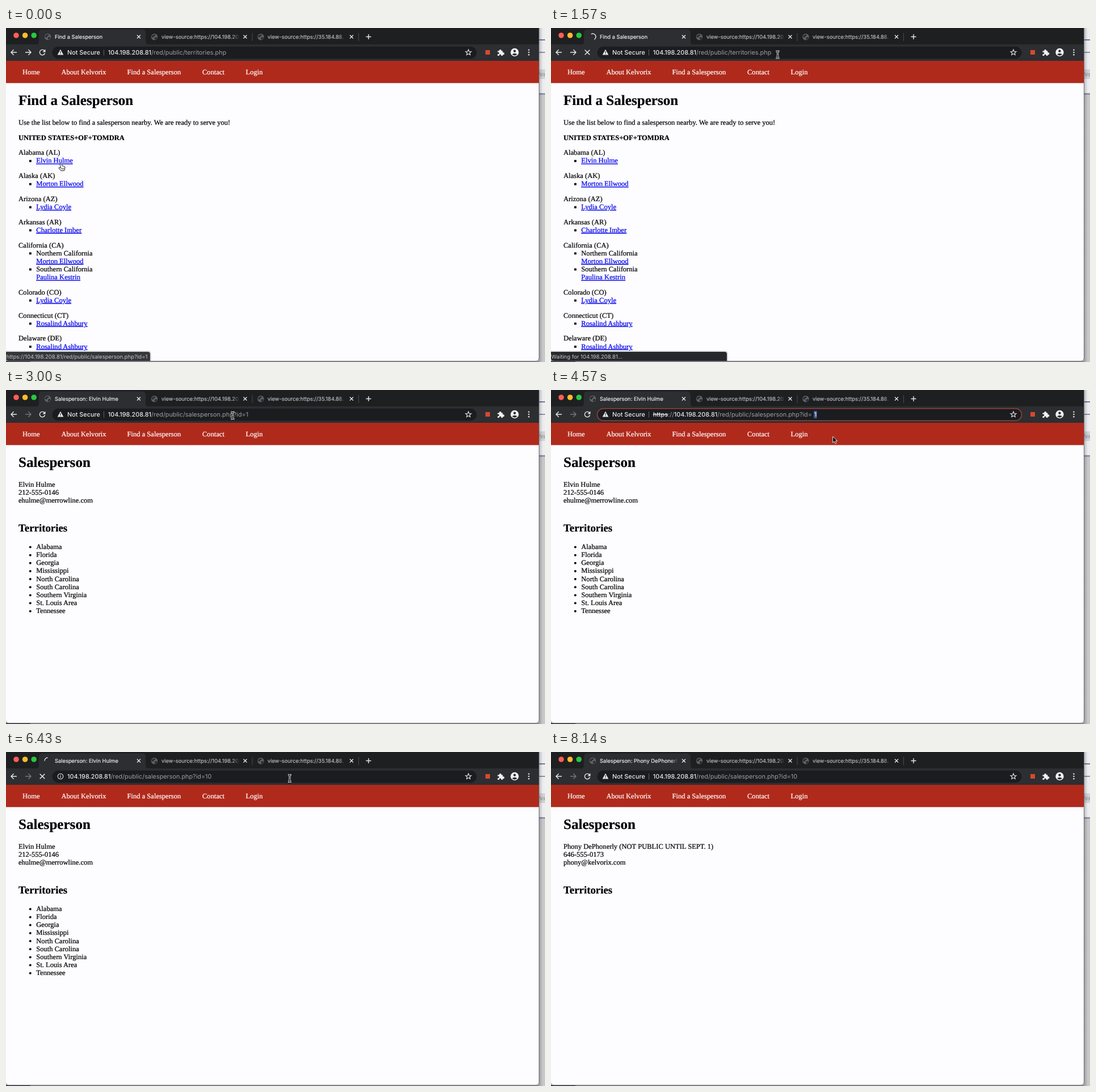
An HTML page for the animation above (8.28 s loop, 950x590 px).

```html
<!DOCTYPE html>
<html lang="en">
<head>
<meta charset="utf-8">
<title>Find a Salesperson</title>
<style>
html, body { margin: 0; width: 100%; height: 100%; overflow: hidden; background: #c5c5c8; }
svg { display: block; width: 950px; height: 590px; }
text { white-space: pre; text-rendering: geometricPrecision; }
/* A hairline stroke gives the slightly heavy look of desktop font smoothing. */
.page text { font-family: "Liberation Serif", "Times New Roman", serif; font-size: 12.56px; fill: #000; stroke: #000; stroke-width: .22px; }
.page .h1 { font-size: 25.1px; font-weight: 700; }
.page .h2 { font-size: 18.84px; font-weight: 700; }
.page .bold { font-weight: 700; }
.page .nav { fill: #fff; stroke: #fff; }
.page .link { fill: #00e; stroke: #00e; text-decoration: underline; }
.ui text { font-family: Inter, Roboto, sans-serif; font-size: 10.85px; font-weight: 500; fill: #e8eaed; }
.ui .tab { font-size: 9.35px; font-weight: 400; stroke: #e8eaed; stroke-width: .2px; }
.ui .dim { fill: #9aa0a6; font-weight: 400; }
.ui .idle { fill: #b4b7bc; stroke: #b4b7bc; }
.ui .status { font-size: 9.55px; font-weight: 400; fill: #c4c7cb; }
.icon { fill: none; stroke: #e8eaed; stroke-width: 1.4; }
</style>
</head>
<body>
<svg viewBox="0 0 950 590">
  <defs>
    <linearGradient id="fadeTab"><stop stop-color="#2d2e31" stop-opacity="0"/><stop offset="1" stop-color="#2d2e31"/></linearGradient>
    <linearGradient id="fadeStrip"><stop stop-color="#1e1f21" stop-opacity="0"/><stop offset="1" stop-color="#1e1f21"/></linearGradient>
    <linearGradient id="shade"><stop stop-color="#000" stop-opacity=".24"/><stop offset="1" stop-color="#000" stop-opacity="0"/></linearGradient>
    <clipPath id="window"><path d="M0 0H939V582Q939 588 933 588H5Q0 588 0 583Z"/></clipPath>
    <clipPath id="title0"><rect x="86" y="4" width="137" height="24"/></clipPath>
    <clipPath id="title1"><rect x="274" y="4" width="137" height="24"/></clipPath>
    <clipPath id="title2"><rect x="461" y="4" width="137" height="24"/></clipPath>
  </defs>
  <g id="desk"></g>
  <g clip-path="url(#window)">
    <g class="page" id="page"></g>
    <g class="ui" id="ui"></g>
  </g>
  <g id="pointer"></g>
</svg>
<script>
const LOOP = 8280, STEP = 1000 / 7, LAST = 57;
const HOST = '104.198.208.81', PERSON = 'Elvin Hulme', HIDDEN = 'Phony DePhonerly';
const LINE = 14.13, GAP = 12.56;

const CLICK = 1, COMMIT = 17, PAINT = 19, FOCUS = 25, SELECT = 28,
      TYPE = 41, ENTER = 43, COMMIT2 = 48, PAINT2 = 51;

const el = id => document.getElementById(id);
const rect = (x, y, w, h, fill, more = '') =>
  `<rect x="${x}" y="${y}" width="${w}" height="${h}" fill="${fill}" ${more}/>`;
const circle = (x, y, r, fill, more = '') =>
  `<circle cx="${x}" cy="${y}" r="${r}" fill="${fill}" ${more}/>`;
const text = (x, y, s, cls = '', more = '') => `<text x="${x}" y="${y}" class="${cls}" ${more}>${s}</text>`;
const span = (s, cls, more = '') => `<tspan class="${cls}" ${more}>${s}</tspan>`;
const icon = (d, more = '') => `<path class="icon" d="${d}" ${more}/>`;
const at = (x, y, s) => `<g transform="translate(${x} ${y})">${s}</g>`;
const between = (k, a, b) => k >= a && k < b;

function desk() {
  return rect(0, 0, 950, 590, '#c8c8ca') + rect(939, 0, 11, 118, '#ededf1') +
    rect(939, 20, 11, 2, '#70759a') + rect(939, 42, 11, 2, '#8d90a8') +
    rect(939, 73, 11, 17, '#d3d3d6') + rect(939, 115, 11, 3, '#8f94ad') +
    text(938.5, 85, 'his', '', 'font-family="Liberation Sans, sans-serif" font-size="9.5" font-style="italic" fill="#85858a"') +
    rect(939, 0, 7, 590, 'url(#shade)') + rect(0, 588, 939, 2, '#8d8d91') + rect(0, 588, 43, 2, '#3c3c48') +
    `<path d="M939.4 0V582Q939.4 588.4 933 588.4H5Q0 588.4 0 583" fill="none" stroke="#6a6a6e"/>`;
}

/* ---------- page ---------- */
function pageBase() {
  const nav = [[29, 'Home'], [97.5, 'About Kelvorix'], [213.5, 'Find a Salesperson'], [346, 'Contact'], [422.5, 'Login']];
  return rect(0, 58, 940, 532, '#fdfcfe') + rect(0, 58, 940, 39.3, '#b02a1c') +
    nav.map(([x, s]) => text(x, 82.4, s, 'nav')).join('');
}

function territories() {
  const a = 'Morton Ellwood', b = 'Lydia Coyle', c = 'Rosalind Ashbury';
  const states = [['Alabama (AL)', PERSON], ['Alaska (AK)', a], ['Arizona (AZ)', b],
    ['Arkansas (AR)', 'Charlotte Imber'],
    ['California (CA)', 'Northern California', a, 'Southern California', 'Paulina Kestrin'],
    ['Colorado (CO)', b], ['Connecticut (CT)', c], ['Delaware (DE)', c], ['Florida (FL)']];
  let y = 224.3;
  let out = text(22, 136.1, 'Find a Salesperson', 'h1') +
    text(22, 171, 'Use the list below to find a salesperson nearby. We are ready to serve you!') +
    text(22, 197.7, 'UNITED STATES+OF+TOMDRA', 'bold');
  for (const [label, ...rows] of states) {
    out += text(22, y, label);
    rows.forEach((s, i) => {
      y += LINE;
      const bullet = i % 2 === 0, link = rows.length === 1 || !bullet;
      if (bullet) out += rect(41, y - 5.4, 3.8, 3.8, '#000');
      out += text(53.3, y, s, link ? 'link' : '');
    });
    y += LINE + GAP;
  }
  return out;
}

function salesperson(details, areas) {
  return text(22, 136.1, 'Salesperson', 'h1') +
    details.map((s, i) => text(22, 171 + i * LINE, s)).join('') +
    text(22, 249.6, 'Territories', 'h2') +
    areas.map((s, i) => circle(42.8, 277.6 + i * LINE, 2, '#000') + text(53.3, 281 + i * LINE, s)).join('');
}

const pages = [
  territories(),
  salesperson([PERSON, '212-555-0146', 'ehulme@merrowline.com'],
    ['Alabama', 'Florida', 'Georgia', 'Mississippi', 'North Carolina', 'South Carolina',
      'Southern Virginia', 'St. Louis Area', 'Tennessee']),
  salesperson([HIDDEN + ' (NOT PUBLIC UNTIL SEPT. 1)', '646-555-0173', 'phony@kelvorix.com'], [])
];

/* ---------- browser ---------- */
const globe = (x, y, opacity = 1) => `<g opacity="${opacity}">` + at(x, y, circle(0, 0, 5.7, '#5f6368') +
  `<path d="M-4.5 -2Q-2 -5 1 -4.5L2 -2.5L-.5 -1L-2 1.2L-5 .5ZM0 1.5L3.5 0L5 1.5Q4 4.5 1 5Z" fill="#2b2c2f"/>`) + '</g>';
const cross = (x, y, r, w = 1.3) => icon(`M${x - r} ${y - r}l${2 * r} ${2 * r}m0 ${-2 * r}l${-2 * r} ${2 * r}`, `style="stroke-width:${w}"`);
const arrow = (x, dir, color) =>
  icon(`M${x - 5 * dir} 43H${x + 4.5 * dir}M${x + .4 * dir} 38.3L${x + 5 * dir} 43L${x + .4 * dir} 47.7`, `style="stroke:${color}"`);

function tabTitle(i, s, cls) {
  const x = [86, 274, 461][i];
  return `<g clip-path="url(#title${i})">${text(x, 18.9, s, 'tab ' + cls)}` +
    rect(x + 125, 8, 13, 16, `url(#${i ? 'fadeStrip' : 'fadeTab'})`) + '</g>';
}

function chrome() {
  const lights = ['#ff5f57', '#febc2e', '#28c840'].map((c, i) => circle(18 + 15.6 * i, 13, 4.8, c)).join('');
  const star = Array.from({ length: 10 }, (_, i) => {
    const r = i % 2 ? 2.3 : 5.3, a = i * Math.PI / 5;
    return `${815 + r * Math.sin(a)},${43.3 - r * Math.cos(a)}`;
  }).join(' ');
  return rect(0, 0, 940, 30, '#1e1f21') + rect(0, 29, 940, 29, '#2d2e31') +
    `<path d="M52 29.5Q58 29.5 58 23V9Q58 2.5 64 2.5H240Q246 2.5 246 9V23Q246 29.5 252 29.5Z" fill="#2d2e31"/>` +
    lights + globe(261.5, 15.8) + globe(449, 15.8) +
    tabTitle(1, 'view-source:https://104.198.208', 'idle') + tabTitle(2, 'view-source:https://35.184.88.', 'idle') +
    cross(234, 15.5, 3) + cross(421.5, 15.5, 3) + cross(609, 15.5, 3) +
    rect(433.5, 9, 1, 14, '#4a4c50') + rect(621, 9, 1, 14, '#4a4c50') +
    icon('M634.5 15.5h9m-4.5 -4.5v9') + arrow(14, -1, '#e8eaed') +
    rect(81.5, 32.8, 748, 21.4, '#1b1c1f', 'rx="10.7"') +
    `<polygon class="icon" points="${star}" style="stroke-width:1.1"/>` +
    rect(845, 39, 8, 8, '#d9482f') +
    at(871.5, 43.5, `<path d="M-5 -3H-2.2A2 2 0 1 1 1.6 -3H4V0A2 2 0 1 1 4 3.6V5.5H1.2A1.8 1.8 0 1 0 -2 5.5H-5V2.4A1.8 1.8 0 1 0 -5 -.6Z" fill="#f1f3f4"/>`) +
    circle(896.5, 43, 7.2, '#f1f3f4') + circle(896.5, 40.8, 2.2, '#2d2e31') +
    `<path d="M892 46.6Q896.5 42.8 901 46.6Q896.5 50.8 892 46.6Z" fill="#2d2e31"/>` +
    [38.7, 43, 47.3].map(y => circle(921.5, y, 1.25, '#e8eaed')).join('');
}

// The arc runs anticlockwise from twelve o'clock; its tail follows half a turn behind.
function spinner(ms) {
  const head = ms / 1320 * 2 * Math.PI, tail = Math.max(0, head - Math.PI);
  const p = a => `${73.5 - 5.5 * Math.sin(a)} ${15.5 - 5.5 * Math.cos(a)}`;
  return icon(`M${p(tail)}A5.5 5.5 0 0 0 ${p(head)}`);
}

function tabState(k) {
  const title = k < COMMIT ? 'Find a Salesperson' : 'Salesperson: ' + (k < COMMIT2 ? PERSON : HIDDEN);
  const first = between(k, CLICK, COMMIT), second = between(k, ENTER, COMMIT2);
  const reload = icon('M68.2 40.8A4.7 4.7 0 1 0 68.6 44.3') +
    '<path d="M69.5 37.5V42.5H64.5Z" fill="#e8eaed"/>';
  let mark = globe(73.5, 15.5, between(k, COMMIT, PAINT) || between(k, COMMIT2, PAINT2) ? .4 : 1);
  if (first) mark = spinner(k * STEP - 140);
  if (second) mark = spinner(k * STEP - 6090);
  return tabTitle(0, title, '') + mark + (first || second ? cross(64, 43, 4.3, 1.5) : reload) +
    arrow(39, 1, k < COMMIT ? '#e8eaed' : '#74777b');
}

function address(k) {
  const path = '/red/public/' + (k < COMMIT ? 'territories.php' : 'salesperson.php?id=');
  const id = k < COMMIT ? '' : k < TYPE ? '1' : '10';
  const url = HOST + span(path + id, 'dim');
  const info = circle(96, 43, 4.8, 'none', 'stroke="#e8eaed" stroke-width="1.1"') +
    rect(95.4, 42.3, 1.2, 3.4, '#e8eaed') + rect(95.4, 40, 1.2, 1.3, '#e8eaed');
  const warning = '<path d="M96 37.8L101.3 47.5H90.7Z" fill="#e8eaed"/>' +
    rect(95.4, 41, 1.2, 3.2, '#1b1c1f') + rect(95.4, 45, 1.2, 1.2, '#1b1c1f') +
    text(108, 47, 'Not Secure') + rect(172, 38, 1, 10.5, '#5f6368');
  const ring = rect(81.5, 32.8, 748, 21.4, 'none', 'rx="10.7" stroke="#96423e" stroke-width="1.5"');

  if (between(k, FOCUS, TYPE)) {
    const picked = k >= SELECT;
    const scheme = span('https', '', 'style="text-decoration:line-through"') + span('://', 'dim');
    return ring + warning + text(179.7, 47, scheme) + text(216.8, 47, HOST + span(path, 'dim')) +
      (picked ? rect(463.2, 37, 5.5, 13, '#3d5a96') : rect(469, 37.5, 1, 12, '#e8eaed')) +
      text(463.8, 47, id, picked ? '' : 'dim');
  }
  if (between(k, TYPE, ENTER)) return ring + info + text(108, 47, url);
  if (between(k, ENTER, COMMIT2)) return info + text(108, 47, url);
  return warning + text(179.7, 47, url);
}

function status(k) {
  const bar = (w, fill, s, opacity) => {
    const shape = `<path d="M-2 572H${w - 4}Q${w} 572 ${w} 576V590H-2Z"`;
    return `<g opacity="${opacity}">${shape} fill="none" stroke="#000" stroke-opacity=".14" stroke-width="4"/>` +
      `${shape} fill="${fill}"/>` + text(.6, 583.6, s, 'status') + '</g>';
  };
  if (k < 7) return bar(254, '#36373b', `https://${HOST}/red/public/salesperson.php?id=1`, k < 6 ? 1 : .88);
  if (between(k, 10, PAINT) || between(k, 46, PAINT2)) return bar(310, '#27282b', `Waiting for ${HOST}...`, 1);
  return '';
}

/* ---------- pointer ---------- */
const route = [[0, 97, 240], [1, 97, 240], [6, 388.5, 99], [8, 399.5, 47], [18, 399.5, 47], [20, 399.5, 45],
  [23, 399.5, 45], [25, 466, 45], [28, 470, 44], [32, 496.7, 82], [34, 496.7, 82], [40, 500, 46.5], [LAST, 500, 46.5]];

const shapes = {
  hand: '<path d="M-1 0Q.8 -1.3 1.3 .5L2.2 4Q3.4 3.1 4 4.2Q5.2 3.5 5.6 4.8Q6.9 4.4 7 6L6.5 9.5L5.5 12H-.2L-3.8 7.7Q-4.2 6.1 -2.6 6.4L-.6 7.6L-1.7 1.5Z" fill="#fff" stroke="#111"/>' +
    '<path d="M1.2 7.2V10M3 7.2V10M4.8 7.2V10" stroke="#111" stroke-width=".7"/>',
  arrow: '<path d="M0 0V11L2.5 8.7L4.2 12.6L6.2 11.7L4.5 8H7.9Z" fill="#000" stroke="#fff" stroke-width=".9"/>',
  beam: ['#fff" stroke-width="2.8', '#111" stroke-width="1.2'].map(s =>
    `<path d="M-3 -6Q0 -6 0 -4.5Q0 -6 3 -6M0 -4.5V4.5M-3 6Q0 6 0 4.5Q0 6 3 6M-1.7 2.5H1.7" fill="none" stroke="${s}"/>`).join('')
};

function pointer(k) {
  if (k >= LAST) return '';
  const i = route.findIndex(([end]) => end > k);
  const [a, ax, ay] = route[i - 1], [b, bx, by] = route[i];
  const u = (k - a) / (b - a), e = u * u * (3 - 2 * u);
  const x = ax + (bx - ax) * e, y = ay + (by - ay) * e;
  return at(x, y, k <= 1 ? shapes.hand : y > 33 && y < 55 ? shapes.beam : shapes.arrow);
}

/* ---------- playback ---------- */
const base = pageBase(), frame = chrome();
let shown = -1;

function draw(ms) {
  const k = Math.min(LAST, Math.floor((ms + 5) / STEP));
  if (k === shown) return;
  shown = k;
  el('page').innerHTML = base + pages[k < PAINT ? 0 : k < PAINT2 ? 1 : 2];
  el('ui').innerHTML = frame + tabState(k) + address(k) + status(k);
  el('pointer').innerHTML = pointer(k);
}

el('desk').innerHTML = desk();
const start = performance.now();
function tick() {
  draw((performance.now() - start) % LOOP);
  requestAnimationFrame(tick);
}
tick();
</script>
</body>
</html>
```
